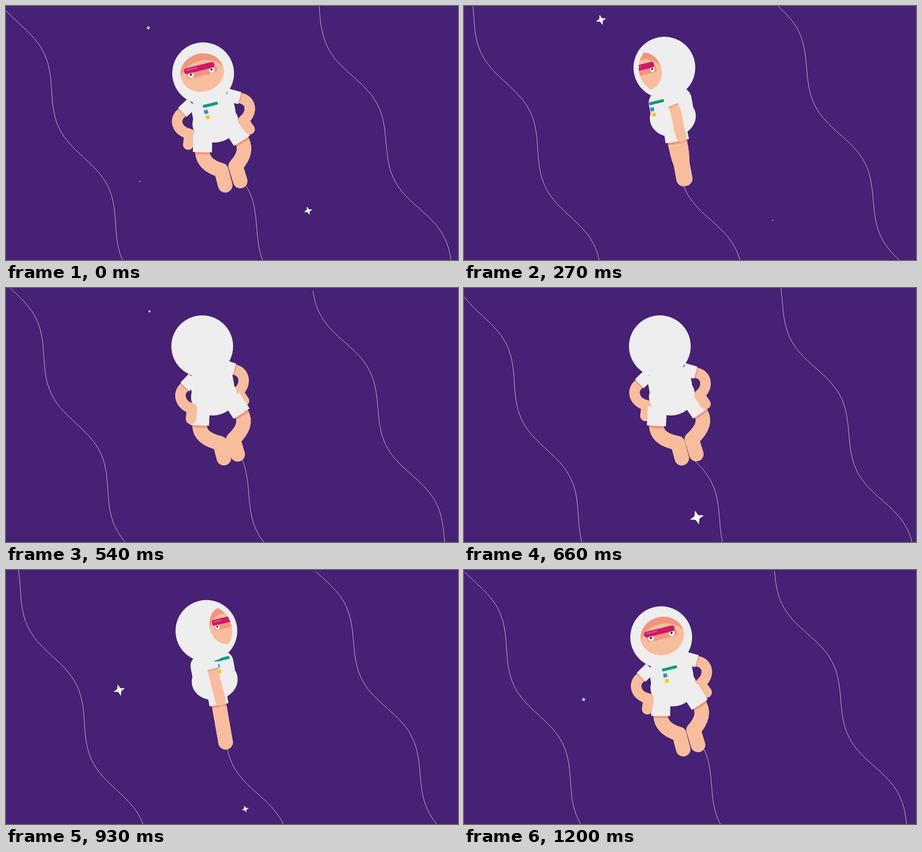
These frames come from a looping animation (900 by 506 pixels, 1.23 s). An HTML page with a canvas:

```html
<!DOCTYPE html>
<html lang="en">
<head>
<meta charset="utf-8">
<title>Floating astronaut</title>
<style>
html, body { margin: 0; width: 100%; height: 100%; overflow: hidden; background: #462175; }
canvas { display: block; }
</style>
</head>
<body>
<canvas id="stage" width="900" height="506"></canvas>
<script>
const ctx = document.getElementById('stage').getContext('2d');
const LOOP = 1230, STEP = 30, TAU = Math.PI * 2, DEG = Math.PI / 180, TILT = -14 * DEG;
const SPACE = '#462175', SUIT = '#eeeeee', SKIN = '#f8bd9c', BLUSH = '#f2957f';

// Half a figure as [out, down] points: sleeve top, hem, two curve handles, joint, tip.
const ARM = [[36, -49], [59, -36], [80, -28], [79, -2], [55, 9], [63, 29]];
const LEG = [[30, 13], [41, 49], [45, 68], [34, 82], [15, 94], [15.5, 125]];

// Wavy lines: start, x at the bottom edge, wave offset.
const WAVES = [
  { x: 10, y: 0, end: 252.5, offset: 187 },
  { x: 450, y: 343, end: 531, offset: 111 },
  { x: 620.5, y: 1, end: 874.5, offset: 303 }
];

// Every star pops up, then drifts and shrinks at the same pace.
const STARS = [
  { born: -540, x: 241, y: 312 },
  { born: -435, x: 263, y: 13 },
  { born: -270, x: 589, y: 389 },
  { born: 60, x: 263, y: 13 },
  { born: 600, x: 461, y: 453 },
  { born: 770, x: 218, y: 228 }
];

function fillEllipse(x, y, rx, ry, color, angle = 0) {
  ctx.fillStyle = color;
  ctx.beginPath();
  ctx.ellipse(x, y, rx, ry, angle, 0, TAU);
  ctx.fill();
}

function fillBox(x, y, w, h, r, color, angle = 0) {
  ctx.save();
  ctx.translate(x, y);
  ctx.rotate(angle);
  ctx.fillStyle = color;
  ctx.beginPath();
  ctx.roundRect(-w / 2, -h / 2, w, h, r);
  ctx.fill();
  ctx.restore();
}

function strokeLine(x0, y0, x1, y1, width, color) {
  ctx.strokeStyle = color;
  ctx.lineWidth = width;
  ctx.lineCap = 'butt';
  ctx.beginPath();
  ctx.moveTo(x0, y0);
  ctx.lineTo(x1, y1);
  ctx.stroke();
}

function drawWave({ x, y, end, offset }, t) {
  const length = Math.hypot(end - x, 506 - y);
  const ux = (end - x) / length, uy = (506 - y) / length;
  ctx.strokeStyle = 'rgba(240,228,246,.8)';
  ctx.lineWidth = 1;
  ctx.beginPath();
  for (let s = 0; s < length + 30; s += 3) {
    const d = -18.7 * Math.sin(TAU * ((s - offset) / 295 - t / (LOOP / 2)));
    ctx.lineTo(x + ux * s + uy * d, y + uy * s - ux * d);
  }
  ctx.stroke();
}

function drawStar({ born, x, y }, t) {
  const age = t - born, life = 600;
  if (age < 0 || age > life) return;
  const r = 16 * (1 - age / life) * Math.min(1, age / 60);
  ctx.fillStyle = '#fff';
  ctx.beginPath();
  for (let k = 0; k < 8; k++) {
    const angle = k * TAU / 8 - .29, reach = k % 2 ? r * .38 : r;
    ctx.lineTo(x + age * .047 + reach * Math.cos(angle), y + age * .07 + reach * Math.sin(angle));
  }
  ctx.fill();
}

// Foreshortens a limb sideways and leans it; the last two points may swing differently.
function poseLimb(limb, angle, swing, tipSwing = swing) {
  const cos = Math.cos(angle), sin = Math.sin(angle);
  return limb.map(([out, down], i) => {
    const x = out * (i < 4 ? swing : tipSwing);
    return [x * cos - down * sin, x * sin + down * cos];
  });
}

function drawLimb([, hem, handleA, handleB, joint, tip], width) {
  ctx.strokeStyle = SKIN;
  ctx.lineWidth = width;
  ctx.lineCap = ctx.lineJoin = 'round';
  ctx.beginPath();
  ctx.moveTo(...hem);
  ctx.bezierCurveTo(...handleA, ...handleB, ...joint);
  ctx.lineTo(...tip);
  ctx.stroke();
}

function drawSleeve([[x0, y0], [x1, y1]], width, sleeveWidth, band) {
  const k = band / Math.hypot(x1 - x0, y1 - y0);
  strokeLine(x1, y1, x1 + (x1 - x0) * k, y1 + (y1 - y0) * k, width, BLUSH);
  strokeLine(x0, y0, x1, y1, sleeveWidth, SUIT);
}

// An arm circles the body; it comes down and forward while it passes the front.
function drawArm(angle) {
  const side = Math.cos(angle), front = Math.sin(angle);
  const pose = poseLimb(ARM, TILT, side * Math.sqrt(Math.abs(side)));
  ctx.save();
  ctx.translate(5 * front, 12 * front);
  drawLimb(pose, 21);
  drawSleeve(pose, 21, 25, 2.5);
  ctx.restore();
}

function drawLegs(facing) {
  const feet = Math.max(0, 1.1 * Math.abs(facing) - .1);
  const hips = feet * (1.08 - .08 * facing);
  const lean = -(10 + 6 * feet) * DEG;
  const legs = [1, -1].map(side => poseLimb(LEG, lean, side * hips, side * feet));
  legs.forEach(leg => drawLimb(leg, 29));
  legs.forEach(leg => drawSleeve(leg, 29, 38, 4.5));
}

function drawTorso() {
  fillBox(-4, -25, 86, 60, 22, SUIT, -.19);
  fillEllipse(0, 0, 46, 39, SUIT, -.17);
}

function drawBadges(turn) {
  if (Math.abs(turn) > 50) return;
  const x = -9 + turn * .6, y = -38.7 - .27 * x;
  fillBox(x, y, 31, 6, 3, '#0d9f7d', TILT);
  fillBox(x - 8.5, y + 14.2, 7.6, 7.6, .5, '#2e8fc9', TILT);
  fillBox(x - 5.2, y + 24.8, 7.6, 7.6, .5, '#f4cb16', TILT);
}

function drawHead(x, y, turn) {
  fillEllipse(x, y, 61.5, 61.5, SUIT);
  ctx.save();
  ctx.beginPath();
  ctx.arc(x, y, 51, 0, TAU);
  ctx.clip();
  ctx.translate(x, y - 2);
  ctx.rotate(TILT);
  ctx.translate(turn, 0);
  ctx.scale(1 - Math.abs(turn) / 147, 1);
  ctx.beginPath();
  ctx.ellipse(0, 0, 44, 38, 0, 0, TAU);
  ctx.clip();
  fillEllipse(0, 0, 46, 40, BLUSH);
  fillEllipse(0, 14, 48, 38, SKIN);
  fillBox(0, -1, 63, 14, 6, BLUSH);
  for (const eye of [-23, 20]) {
    fillEllipse(eye, -.5, 5.6, 5.6, '#fff');
    fillEllipse(eye - .3, -1.3, 2.2, 2.2, '#1c1420');
  }
  fillBox(-3.5, -10, 63, 11.5, 5, '#cf1a67');
  strokeLine(-30, -11.8, -8, -11.8, 1.8, '#f0659c');
  ctx.restore();
}

function draw(t) {
  ctx.fillStyle = SPACE;
  ctx.fillRect(0, 0, 900, 506);
  WAVES.forEach(wave => drawWave(wave, t));
  STARS.forEach(star => drawStar(star, t));

  // One full spin per loop; the face slides evenly from side to side.
  const spin = TAU * t / LOOP, facing = Math.cos(spin), double = Math.cos(2 * spin);
  const turn = -2 - 27 * (spin > Math.PI ? spin - TAU : spin);
  const headX = 395 - 4 * double + 1.5 * facing;
  const headY = 123 + 9 * facing + 2 * double;
  const arms = [spin, (spin + Math.PI) % TAU];

  ctx.save();
  ctx.translate(415.5 + 1.5 * facing, headY + 98.7);
  arms.filter(a => a >= Math.PI).forEach(drawArm);
  drawLegs(facing);
  drawTorso();
  drawBadges(turn);
  arms.filter(a => a < Math.PI).forEach(drawArm);
  ctx.restore();
  drawHead(headX, headY, turn);
}

function tick() {
  const t = performance.now() % LOOP;
  draw(Math.floor(t / STEP) * STEP);
  requestAnimationFrame(tick);
}
tick();
</script>
</body>
</html>
```
